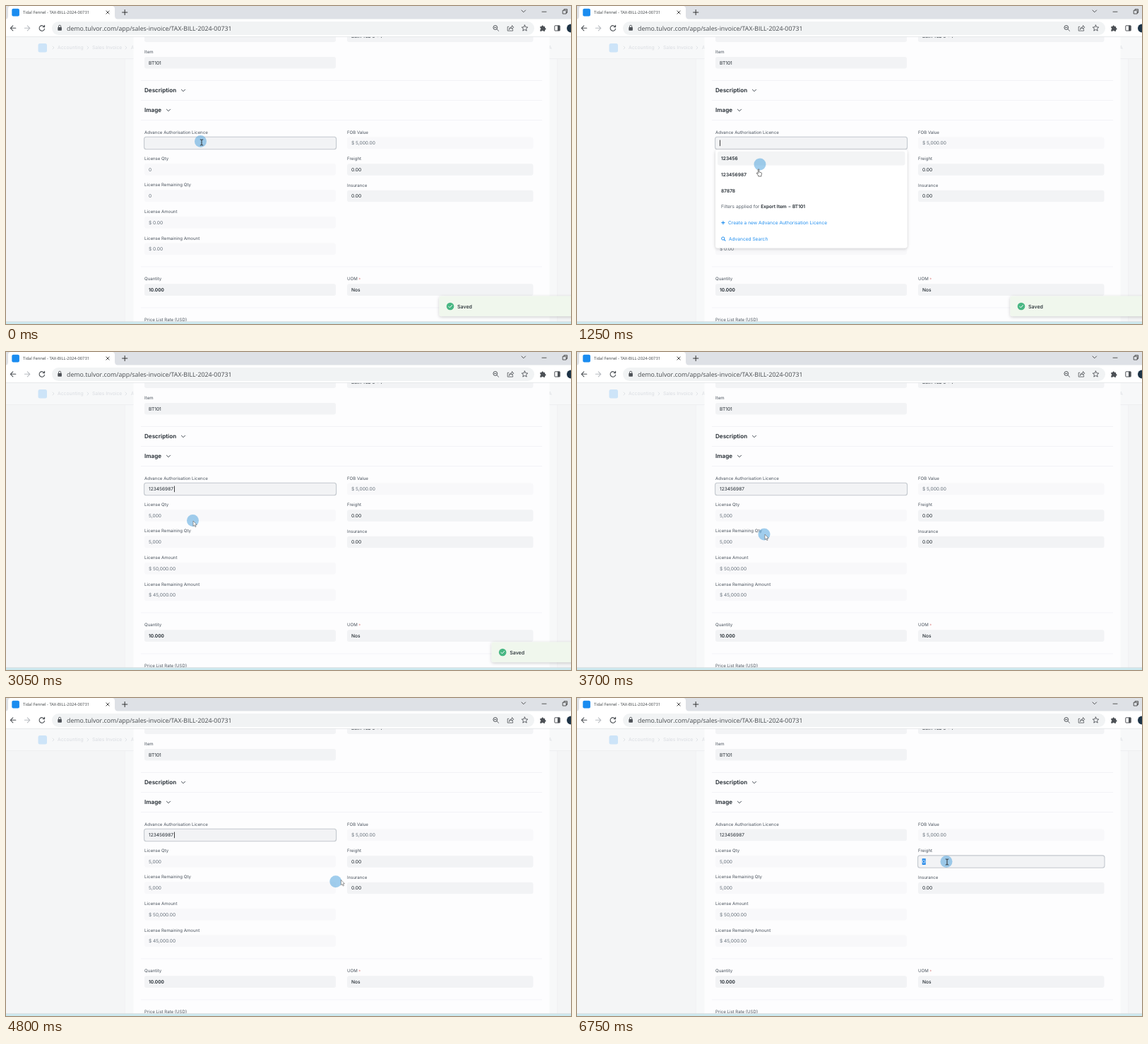
An HTML page that plays this animation: 800 by 450 pixels, repeating every 8 s.

```html
<!DOCTYPE html>
<html lang="en">
<head>
<meta charset="utf-8">
<title>Invoice form</title>
<style>
html, body { margin: 0; width: 100%; height: 100%; overflow: hidden; background: #f4f5f6; }
svg { display: block; width: 800px; height: 450px; }
text { font-family: Inter, sans-serif; text-rendering: geometricPrecision; white-space: pre; }
.ui text { font-family: "Open Sans", "Noto Sans", sans-serif; }
.line { fill: none; stroke-linecap: round; stroke-linejoin: round; }
</style>
</head>
<body>
<svg id="stage" viewBox="0 0 800 450" xmlns="http://www.w3.org/2000/svg"></svg>
<script>
const LOOP = 8000;
const INK = '#1f272e', SOFT = '#6a747e', LABEL = '#4a535d', BLUE = '#2490ef', PALE = '#d9dce1';
const LEFT = 196, RIGHT = 483;

// Drawing helpers; text is placed by the middle of its capitals.
const rect = (x, y, w, h, fill, r = 0, extra = '') =>
  `<rect x="${x}" y="${y}" width="${w}" height="${h}" rx="${r}" fill="${fill}" ${extra}/>`;
const text = (x, cy, str, size = 6.6, fill = INK, weight = 400, extra = '') =>
  `<text x="${x}" y="${(cy + size * 0.364).toFixed(2)}" font-size="${size}" fill="${fill}" font-weight="${weight}" ${extra}>${str}</text>`;
const line = (d, stroke, width = 1, extra = '') =>
  `<path class="line" d="${d}" stroke="${stroke}" stroke-width="${width}" ${extra}/>`;
const dot = (x, y, r, fill, extra = '') => `<circle cx="${x}" cy="${y}" r="${r}" fill="${fill}" ${extra}/>`;
const group = (id, body, extra = '') => `<g id="${id}" ${extra}>${body}</g>`;

const label = (x, cy, str) => text(x, cy, str, 6.1, LABEL);
const box = (x, cy, fixed) =>
  rect(x, cy - 8.3, x === LEFT ? 271 : 263.5, 16.6, fixed ? '#f8f8fa' : '#f2f3f5', 3);
const field = (x, cy, name, value, { fixed = false, weight = 400, id = '' } = {}) =>
  label(x, cy - 15.4, name) + box(x, cy, fixed) +
  text(x + 6, cy, value, 6.6, fixed ? SOFT : INK, weight, id && `id="${id}"`);
const focusRing = (id, x, cy, w) =>
  group(id, rect(x - 0.4, cy - 8.6, w, 17.4, '#f2f3f5', 3, 'stroke="#c3c8ce" stroke-width="1.1"'));
const rule = y => rect(191, y, 568, 0.8, '#f0f1f4');
const section = (cy, name, arrowX) =>
  text(LEFT, cy, name, 8.1, INK, 600) + line(`M${arrowX - 2.6} ${cy - 0.8}l2.6 2.6 2.6-2.6`, '#333c44', 0.9);

function page() {
  const crumb = x => line(`M${x} 57l2 2-2 2`, PALE, 0.8);
  return rect(0, 43, 800, 407, '#f4f5f6') +
    rect(168, 75, 612, 375, '#f7f8f9') +
    rect(168, 75, 0.7, 375, '#eff0f2') + rect(780, 75, 0.7, 375, '#eff0f2') +
    rect(0, 43, 800, 31.5, '#f7f8f9') + rect(0, 74.3, 800, 0.8, '#ebedef') +
    rect(45.5, 53, 12.5, 12.5, '#cde4f8', 2.5) +
    crumb(66) + text(73, 59, 'Accounting', 6.8, PALE) +
    crumb(115) + text(122, 59, 'Sales Invoice', 6.8, PALE) +
    crumb(169) + text(177, 59, 'A', 6.8, PALE) + text(768, 59, 'A', 6.8, PALE);
}

function form() {
  const fixed = { fixed: true };
  return rect(180.5, 43, 589, 407, '#fdfdfe') +
    box(LEFT, 42.7) + box(RIGHT, 42.7) + text(489, 42.7, 'Bath Tub 5 * 7') +
    field(LEFT, 80.2, 'Item', 'BT101') +
    rule(105) + section(119, 'Description', 251) +
    rule(133) + section(147, 'Image', 230) + rule(161) +
    field(LEFT, 193.9, 'Advance Authorisation Licence', '') +
    field(LEFT, 231.2, 'License Qty', '', { fixed: true, id: 'qty' }) +
    field(LEFT, 268.6, 'License Remaining Qty', '', { fixed: true, id: 'qtyLeft' }) +
    field(LEFT, 306.2, 'License Amount', '', { fixed: true, id: 'amount' }) +
    field(LEFT, 343.8, 'License Remaining Amount', '', { fixed: true, id: 'amountLeft' }) +
    field(RIGHT, 193.9, 'FOB Value', '$ 5,000.00', fixed) +
    field(RIGHT, 231.5, 'Freight', '') +
    field(RIGHT, 269, 'Insurance', '0.00') +
    rule(368.6) +
    field(LEFT, 401.6, 'Quantity', '10.000', { weight: 600 }) +
    field(RIGHT, 401.6, 'UOM', 'Nos', { weight: 500 }) + text(499.3, 386.6, '*', 6.1, '#e08a8a') +
    rule(426.6) + label(LEFT, 443.3, 'Price List Rate (USD)') +
    focusRing('licenceFocus', LEFT, 193.9, 272) + focusRing('freightFocus', RIGHT, 231.5, 264.4) +
    text(202, 193.9, '', 6.6, INK, 400, 'id="licence"') +
    rect(0, 189.6, 0.8, 8.6, '#111', 0, 'id="caret"') +
    rect(488.7, 227.2, 5, 8.8, '#2488e8', 0, 'id="selection"') +
    text(489, 231.5, '', 6.6, INK, 400, 'id="freight"');
}

function menu() {
  const bold = '<tspan font-weight="600" fill="#1f272e">';
  return group('menu',
    rect(196, 203.6, 271.5, 139, '#fff', 3.5, 'filter="url(#shade)"') +
    rect(199, 205.8, 265.5, 19.6, '#f3f4f5', 3, 'id="hover"') +
    ['123456', '123456987', '87878'].map((s, i) => text(204, 215.7 + 22.8 * i, s, 6.6, INK, 600)).join('') +
    text(204, 284, `Filters applied for ${bold}Export Item</tspan> = ${bold}BT101</tspan>`, 6.6, '#59626c') +
    line('M204.8 306.6h4.2M206.9 304.5v4.2', BLUE, 1.1) +
    text(214, 306.7, 'Create a new Advance Authorisation Licence', 6.6, BLUE) +
    dot(206.8, 329, 2.1, 'none', `stroke="${BLUE}" stroke-width="1"`) + line('M208.4 330.6l1.6 1.6', BLUE, 1.1) +
    text(215, 329.4, 'Advanced Search', 6.6, BLUE));
}

const toast = () => group('toast',
  rect(613.5, 410.5, 200, 28.5, '#f0f7ed', 3, 'filter="url(#shade)"') +
  dot(629, 425, 5.3, '#48b783') + line('M626.7 425.1l1.7 1.7 3-3.3', '#fff', 1) +
  text(639, 425, 'Saved', 7.1, INK, 500));

function browser() {
  const ink = '#4d5156', url = '#45494d';
  return group('browser',
    rect(0, 0, 800, 19, '#dee1e6') +
    `<path d="M0 19Q3 18 3 14V4Q3 0 7 0H150Q154 0 154 4V14Q154 18 158 19Z" fill="#fff"/>` +
    rect(0, 18.5, 800, 25, '#fff') + rect(0, 43, 800, 0.8, '#e3e5e8') +
    rect(8.3, 3.8, 10.6, 10.6, '#1a8cf0', 2) +
    text(24, 9.3, 'Tidal Fennel - TAX-BILL-2024-00731', 5.8, '#3c4043') +
    line('M141.9 6.9l4.2 4.2M146.1 6.9l-4.2 4.2', '#333', 0.9) +
    line('M164.6 9h7.2M168.2 5.4v7.2', '#333', 1) +
    line('M730 6l2.8 2.8 2.8-2.8', '#333', 0.8) + line('M759 8.2h6', '#333', 0.8) +
    line('M788.6 6.2h4.6v4.8h-4.6zM790 6v-1.4h4.6v4.9h-1.2', '#333', 0.8) +
    line('M6.4 31.3h7.4M9.8 27.8l-3.5 3.5 3.5 3.5', ink, 1.1) +
    line('M26.4 31.3h7.4M30.3 27.8l3.5 3.5-3.5 3.5', '#b9bdc2', 1.1) +
    line('M54.1 29.4a3.8 3.8 0 1 0 .5 3M54.6 27.3v2.4h-2.4', ink, 1.1) +
    rect(65, 22, 683, 19, '#f1f3f4', 9.5) +
    rect(73.3, 30, 5.6, 4.8, ink, 0.7) + line('M74.5 30v-1.2a1.6 1.6 0 0 1 3.2 0V30', ink, 0.9) +
    text(86, 31.4, 'demo.tulvor.com/app/sales-invoice/TAX-BILL-2024-00731', 8.8, url) +
    dot(692.8, 30.5, 2.9, 'none', `stroke="${ink}"`) + line('M695 32.7l2.6 2.6M691.5 30.5h2.6', ink, 0.9) +
    line('M711.8 29.3h-1.6v5.8h7.4v-1.8M712.3 33q.4-3.4 4.2-3.6v-1.9l2.4 2.6-2.4 2.6v-1.7q-2.6 0-4.2 1.9z', ink, 0.8) +
    line('M734.5 27l1.3 2.8 3 .3-2.3 2 .7 3-2.7-1.6-2.7 1.6.7-3-2.3-2 3-.3z', ink, 0.9) +
    `<path d="M756.3 29h2a1.4 1.4 0 0 1 2.8 0h2v2a1.4 1.4 0 0 1 0 2.8v2h-2.2a1.3 1.3 0 0 0-2.5 0h-2.1v-2.2a1.3 1.3 0 0 0 0-2.5z" fill="${ink}"/>` +
    rect(776.8, 27.8, 7.4, 7.2, 'none', 0.6, `stroke="${ink}"`) + rect(781, 27.8, 3.2, 7.2, ink) +
    dot(800, 31.4, 6, '#1d3346') +
    rect(0, 446.3, 800, 1, '#d5dadd') + rect(0, 447.2, 800, 2.8, '#cbe8ee'),
    'class="ui"');
}

const pointers = () =>
  group('halo', dot(0, 0, 8.5, '#4ba2dc', 'opacity=".52"')) +
  group('ibeam', line('M-1.8-4h1.3l.5.5.5-.5h1.3M0-3.5v7M-1.8 4h1.3l.5-.5.5.5h1.3', '#222', 0.9)) +
  group('hand', `<path d="M-1.6-4.8q.8-.8 1.5 0V-1l2.9.7q1 .4.8 1.5L3 3.8V5h-4.2V4L-3.6.8q-.2-1 .7-.8l1.3 1z" fill="#fff" stroke="#4c4c4c" stroke-width=".75" stroke-linejoin="round"/>`) +
  group('arrow', `<path d="M0 0V7.4L1.7 5.9 2.9 8.6 4.1 8.1 2.9 5.4H5.2Z" fill="#fff" stroke="#666" stroke-width=".65" stroke-linejoin="round"/>`);

document.getElementById('stage').innerHTML =
  `<defs><filter id="shade" x="-10%" y="-30%" width="120%" height="160%">
    <feDropShadow dx="0" dy="1.2" stdDeviation="2" flood-color="#1f272e" flood-opacity=".2"/></filter></defs>` +
  page() + form() + menu() + toast() + browser() + pointers();

const el = {};
document.querySelectorAll('#stage [id]').forEach(node => el[node.id] = node);

// Rows: time, x, y
const pointerPath = [
  [0, 277, 193], [600, 277, 193], [1000, 262, 218], [1100, 260, 224], [1250, 258, 236], [1400, 255, 239],
  [2000, 255, 238], [2150, 255, 236], [2750, 255, 236], [3000, 265, 239], [3150, 265, 239], [3500, 251, 211],
  [3600, 251, 211], [3700, 266, 258], [3850, 266, 258], [4050, 296, 292], [4250, 364, 284.5], [4350, 456, 268],
  [4450, 429, 267], [4650, 429, 267], [4950, 519, 248], [5150, 519, 249], [5250, 524, 232], [LOOP, 524, 232]
];
const haloPath = [
  [0, 275.5, 191.5], [650, 275.5, 191.5], [1050, 262, 214], [1250, 259, 224], [1450, 255, 238],
  [2000, 255, 237], [2150, 254.5, 235.5], [2800, 254.5, 235.5], [3000, 264.5, 238.5], [3200, 264.5, 238.5],
  [3550, 250, 211], [3600, 250, 211], [3700, 265, 258], [3900, 265, 258], [4250, 296, 292], [4450, 428, 268],
  [4650, 428, 268], [5000, 518, 249], [5150, 518, 250], [5250, 523, 238], [5450, 523, 238], [5550, 523, 231.5],
  [LOOP, 523, 231.5]
];

function along(path, t) {
  const i = Math.max(1, path.findIndex(row => row[0] > t));
  const [a, b] = [path[i - 1], path[i]];
  const k = (t - a[0]) / (b[0] - a[0]);
  return [a[1] + (b[1] - a[1]) * k, a[2] + (b[2] - a[2]) * k];
}

const between = (t, a, b) => t >= a && t < b;
const show = (node, on) => node.setAttribute('visibility', on ? 'visible' : 'hidden');
const move = (node, [x, y]) => node.setAttribute('transform', `translate(${x.toFixed(2)} ${y.toFixed(2)})`);
const write = (node, str) => { if (node.textContent !== str) node.textContent = str; };

function draw(t) {
  const open = between(t, 500, 2000), picked = t >= 2000, filled = t >= 2150, freight = t >= 5600;

  write(el.licence, picked ? '123456987' : '');
  write(el.qty, filled ? '5,000' : '0');
  write(el.qtyLeft, filled ? '5,000' : '0');
  write(el.amount, filled ? '$ 50,000.00' : '$ 0.00');
  write(el.amountLeft, filled ? '$ 45,000.00' : '$ 0.00');
  write(el.freight, freight ? '0' : '0.00');
  el.freight.setAttribute('fill', freight ? '#fff' : INK);
  show(el.selection, freight);
  show(el.licenceFocus, !freight);
  show(el.freightFocus, freight);

  show(el.caret, between(t, 300, 1300) || between(t, 2000, 3200) || between(t, 4200, 5200));
  el.caret.setAttribute('x', picked ? 238.2 : 202.2);

  el.menu.style.display = open ? '' : 'none';
  el.hover.setAttribute('y', t < 1300 ? 205.8 : 228.6);

  const slide = Math.min(1, Math.max(0, (t - 2800) / 650));
  move(el.toast, [slide * 192, 0]);
  show(el.toast, slide < 1);

  const at = along(pointerPath, t);
  const kind = open && at[1] > 204 ? 'hand' : t < 2000 || t >= 5200 ? 'ibeam' : 'arrow';
  for (const name of ['ibeam', 'hand', 'arrow']) {
    show(el[name], name === kind);
    move(el[name], at);
  }
  move(el.halo, along(haloPath, t));
}

const start = performance.now();
function tick() {
  draw((performance.now() - start) % LOOP);
  requestAnimationFrame(tick);
}
tick();
</script>
</body>
</html>
```
